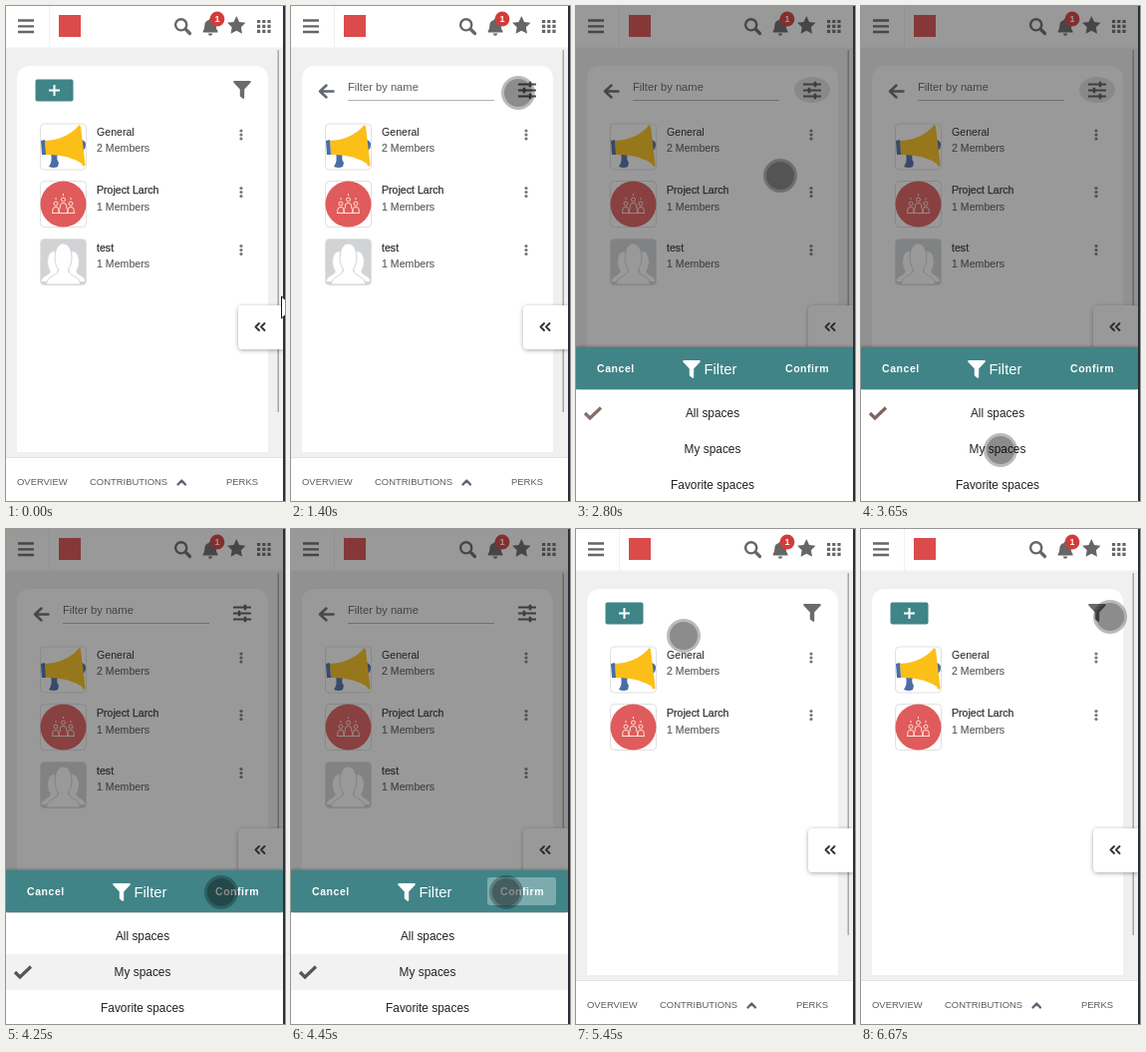
Animation, 280 px wide and 496 px high, one loop 8.06 s. Source, as an HTML page:

```html
<!DOCTYPE html>
<html lang="en">
<head>
<meta charset="utf-8">
<title>Spaces filter</title>
<style>
html, body { margin: 0; width: 100%; height: 100%; overflow: hidden; background: #f0f0f0; }
svg { display: block; width: 280px; height: 496px; }
text { font: 10.6px "Liberation Sans", Arial, sans-serif; fill: #5c5c5c; }
.name { fill: #222; }
.heavy { fill: #333; stroke: #333; stroke-width: .25px; }
.count { stroke: #5c5c5c; stroke-width: .15px; }
.nav text { font-size: 9.45px; }
.act { font-size: 10.5px; font-weight: bold; letter-spacing: .55px; fill: #fff; }
.opt { font-size: 11.9px; fill: #222; text-anchor: middle; }
.line { fill: none; stroke-linecap: round; stroke-linejoin: round; }

/* One 8060 ms clock with held poses */
.t { animation: 8060ms step-end infinite; }
.arrow { animation-name: arrow; }
.bar { animation-name: bar; }
.search { animation-name: search; }
.pick { animation-name: pick; }
.focus { animation-name: focus; }
.gone { animation-name: gone; }
.shade { animation-name: shade; }
.drawer { animation-name: drawer; }
.row { animation-name: row; }
.tick { animation-name: tick; }
.press { animation-name: press; }
.touch { animation-name: move; }

@keyframes arrow { 0% { opacity: 1 } 2.48%, 100% { opacity: 0 } }
@keyframes bar { 0% { opacity: 1 } 14.88% { opacity: 0 } 57.69%, 100% { opacity: 1 } }
@keyframes search { 0% { opacity: 0 } 14.88% { opacity: 1 } 57.69%, 100% { opacity: 0 } }
@keyframes pick { 0% { opacity: 0 } 29.77% { opacity: 1 } 32.25%, 100% { opacity: 0 } }
@keyframes focus { 0% { opacity: 0 } 32.25% { opacity: 1 } 47.76%, 100% { opacity: 0 } }
@keyframes gone { 0% { opacity: 1 } 57.69%, 100% { opacity: 0 } }
@keyframes shade {
  0% { opacity: 0 } 29.77% { opacity: .07 } 32.25% { opacity: .46 }
  57.69% { opacity: .02 } 60.17%, 100% { opacity: 0 }
}
@keyframes drawer {
  0% { transform: translateY(160px) } 29.77% { transform: none }
  60.17%, 100% { transform: translateY(160px) }
}
@keyframes row { 0% { opacity: 0 } 47.76% { opacity: 1 } 57.69%, 100% { opacity: 0 } }
@keyframes tick {
  0% { transform: none; stroke: #866d66 } 45.28% { stroke: #7a665f; transform: none }
  47.76%, 100% { transform: translateY(36px); stroke: #5a5459 }
}
@keyframes press { 0% { opacity: 0 } 55.21% { opacity: 1 } 60.17%, 100% { opacity: 0 } }
@keyframes move {
  0% { transform: translate(310px, 303px) }
  2.48% { transform: translate(258px, 205px) }
  4.96% { transform: translate(222px, 100px) }
  7.44% { transform: translate(213px, 79px) }
  9.92% { transform: translate(228px, 87px) }
  34.73% { transform: translate(205px, 170px) }
  37.84% { transform: translate(165px, 330px) }
  40.32% { transform: translate(148px, 416px) }
  42.8% { transform: translate(140px, 445px) }
  50.24% { transform: translate(182px, 400px) }
  52.72% { transform: translate(216px, 364px) }
  60.17% { transform: translate(205px, 335px) }
  62.65% { transform: translate(160px, 250px) }
  65.13% { transform: translate(118px, 140px) }
  67.61% { transform: translate(108px, 107px) }
  77.79% { transform: translate(185px, 98px) }
  80.27% { transform: translate(262px, 91px) }
  82.75%, 100% { transform: translate(250px, 88px) }
}
</style>
</head>
<body>
<svg viewBox="0 0 280 496">
  <defs>
    <path id="funnel" d="M1 0H17Q18.600 .4 17.500 1.800L11.200 8.500V17Q10.800 18.400 9.500 17.600L7.200 15.800Q6.800 15.400 6.800 14.800V8.500L.5 1.800Q-.6 .4 1 0Z"/>
    <g id="more" fill="#777"><circle cy="-4" r="1.600"/><circle r="1.600"/><circle cy="4" r="1.600"/></g>
    <rect id="frame" x="34.500" width="46" height="46" rx="4" stroke="#e0e0e0"/>
    <path id="bust" d="M-17 22C-17 13 -5 14 -5 7C-11 -1 -9 -19 0 -19S11 -1 5 7C5 14 17 13 17 22Z"/>
    <g id="person"><circle cy="-5" r="2"/><path d="M-3.200 4V1Q-3.200 -1.500 0 -1.500T3.200 1V4"/></g>
    <filter id="soft" x="-30%" y="-30%" width="160%" height="160%">
      <feDropShadow dx="0" dy="1" stdDeviation="2" flood-opacity=".35"/>
    </filter>
  </defs>

  <rect width="280" height="496" fill="#f0f0f0"/>
  <path d="M11 447V74Q11 60 25 60H249Q263 60 263 74V447Z" fill="#fff"/>
  <rect x="272.500" y="44" width="1.500" height="363" fill="#a6a6a6"/>

  <!-- Top bar -->
  <rect width="278" height="41.500" fill="#fff"/>
  <path d="M43.500 0V41" stroke="#f0f0f0"/>
  <path d="M12 14.500H28M12 20.300H28M12 26H28" stroke="#666" stroke-width="2.300"/>
  <rect x="53" y="9" width="22" height="22" fill="#dc4b4b"/>
  <g fill="#666">
    <path class="line" d="M180.500 23.500L184.500 27.500" stroke="#666" stroke-width="3.200"/>
    <circle cx="175.700" cy="18.800" r="5.600" fill="none" stroke="#666" stroke-width="2.400"/>
    <path d="M205 12.500Q206.300 12.500 206.300 14Q210.800 15 210.800 20Q210.800 23.500 212.500 25V26.500H197.700V25Q199.300 23.500 199.300 20Q199.300 15 203.700 14Q203.700 12.500 205 12.500ZM203 27.500H207.200Q207 29.800 205 29.800T203 27.500Z"/>
    <path d="M231.300 10L234.100 15.900L240.500 16.800L235.900 21.300L237 27.700L231.300 24.700L225.600 27.700L226.700 21.300L222.100 16.800L228.500 15.900Z"/>
    <path d="M252 15.500H265.600M252 20.400H265.600M252 25.300H265.600" stroke="#666" stroke-width="3.200" stroke-dasharray="3.200 2"/>
  </g>
  <circle cx="212" cy="13" r="7.400" fill="#d33b3b"/>
  <text x="212" y="16.300" text-anchor="middle" style="font-size:9px;font-weight:bold;fill:#fff">1</text>

  <!-- Card toolbar -->
  <g class="t bar">
    <rect x="29.500" y="73.500" width="38" height="22" rx="2" fill="#3f8487"/>
    <path d="M43 84.500H54M48.500 79V90" stroke="#fff" stroke-width="2"/>
    <use href="#funnel" x="228" y="75" fill="#6b6b6b"/>
  </g>
  <g class="t search">
    <path class="line" d="M42.500 85.500H29.500M35.500 79.500L29 85.500L35.500 91.500" stroke="#626770" stroke-width="2.500"/>
    <text x="57" y="85" style="font-size:11.2px">Filter by name</text>
    <path d="M57 94.500H204" stroke="#b0b0b0"/>
    <ellipse class="t focus" cx="237" cy="84" rx="18" ry="13" fill="#000" fill-opacity=".12"/>
    <rect class="t pick" x="224" y="74" width="27" height="20" fill="#add8ea"/>
    <path d="M228 78.500H246M228 84.500H246M228 90.500H246" stroke="#555" stroke-width="1.800"/>
    <path d="M240 75.800V81.200M234 81.800V87.200M240 87.800V93.200" stroke="#555" stroke-width="2.500"/>
  </g>

  <!-- Spaces -->
  <g>
    <use href="#frame" y="118" fill="#fff"/>
    <path d="M45 148H52Q50 153 53 157L52 161Q48 163 43 161Q47 155 45 148Z" fill="#4a6da7"/>
    <path d="M39 135Q60 134 73 120L78 159Q62 148 40 149Z" fill="#fbbf17"/>
    <path d="M35 135L39 134L40 149L36 149Z" fill="#4a6da7"/>
    <path d="M75.500 134Q80.500 135 80 139.500T76.500 145Z" fill="#4a6da7"/>
    <path class="line" d="M73.500 121L78 159" stroke="#fbbf17" stroke-width="3"/>
    <text class="name" x="91" y="130">General</text>
    <text class="count" x="91" y="146">2 Members</text>
    <use href="#more" x="236" y="129"/>
  </g>
  <g>
    <use href="#frame" y="175.500" fill="#fff"/>
    <circle cx="57.500" cy="198.500" r="23" fill="#e05b5b"/>
    <g fill="none" stroke="#fbe3d6">
      <use href="#person" x="57.500" y="199"/>
      <use href="#person" x="50" y="203"/>
      <use href="#person" x="65" y="203"/>
      <path d="M46 207.500H69M53 203V207M62 203V207M50 192V194M65 192V194M57.500 188V190"/>
    </g>
    <text class="name heavy" x="91" y="188">Project Larch</text>
    <text class="count" x="91" y="205">1 Members</text>
    <use href="#more" x="236" y="186.500"/>
  </g>
  <g class="t gone">
    <use href="#frame" y="233.500" fill="#d1d3d5"/>
    <g fill="#fff" stroke="#d1d3d5">
      <use href="#bust" transform="translate(48 260) scale(.75)"/>
      <use href="#bust" transform="translate(67 260) scale(.75)"/>
      <use href="#bust" x="57.500" y="257"/>
    </g>
    <text class="name heavy" x="91" y="246">test</text>
    <text class="count" x="91" y="262">1 Members</text>
    <use href="#more" x="236" y="244.500"/>
  </g>

  <!-- Side tab and bottom menu -->
  <path d="M278 300H238Q233 300 233 305V339Q233 344 238 344H278Z" fill="#fff" filter="url(#soft)"/>
  <path class="line" d="M254 318L250.500 321.500L254 325M259.500 318L256 321.500L259.500 325" stroke="#333" stroke-width="1.900"/>
  <g class="nav">
    <rect y="453" width="278" height="43" fill="#fff"/>
    <path d="M0 452.500H278" stroke="#e3e3e3"/>
    <text x="11" y="480">OVERVIEW</text>
    <text x="84" y="480">CONTRIBUTIONS</text>
    <text x="221" y="480">PERKS</text>
    <path class="line" d="M172.500 479.500L176.300 475.500L180 479.500" stroke="#5b6270" stroke-width="2.300"/>
  </g>

  <rect class="t shade" width="278" height="496" fill="#212121"/>

  <!-- Filter sheet -->
  <g class="t drawer">
    <rect y="342" width="278" height="154" fill="#fff" filter="url(#soft)"/>
    <rect y="342" width="278" height="42" fill="#3f8487" filter="url(#soft)"/>
    <rect y="385" width="278" height="111" fill="#fff"/>
    <text class="act" x="21" y="367">Cancel</text>
    <use href="#funnel" x="107" y="355" fill="#fff"/>
    <text x="128.500" y="369" style="font-size:14.85px;fill:#fff">Filter</text>
    <text class="act" x="210" y="367">Confirm</text>
    <rect class="t press" x="197" y="349" width="69" height="28" rx="3" fill="#fff" fill-opacity=".32"/>
    <rect class="t row" y="426" width="278" height="36" fill="#f2f2f2"/>
    <path class="t tick" d="M9 408L14 413L25 402.500" fill="none" stroke-width="3.200"/>
    <text class="opt" x="137" y="412">All spaces</text>
    <text class="opt" x="137" y="448">My spaces</text>
    <text class="opt" x="137" y="484">Favorite spaces</text>
  </g>

  <rect x="278" width="2" height="496" fill="#2b2e36"/>
  <path class="t arrow" d="M276.500 291V313L281 309V295Z" fill="#fff" stroke="#111"/>
  <g class="t touch">
    <circle r="17" fill-opacity=".27"/>
    <circle r="14" fill-opacity=".25"/>
  </g>
</svg>
</body>
</html>
```
